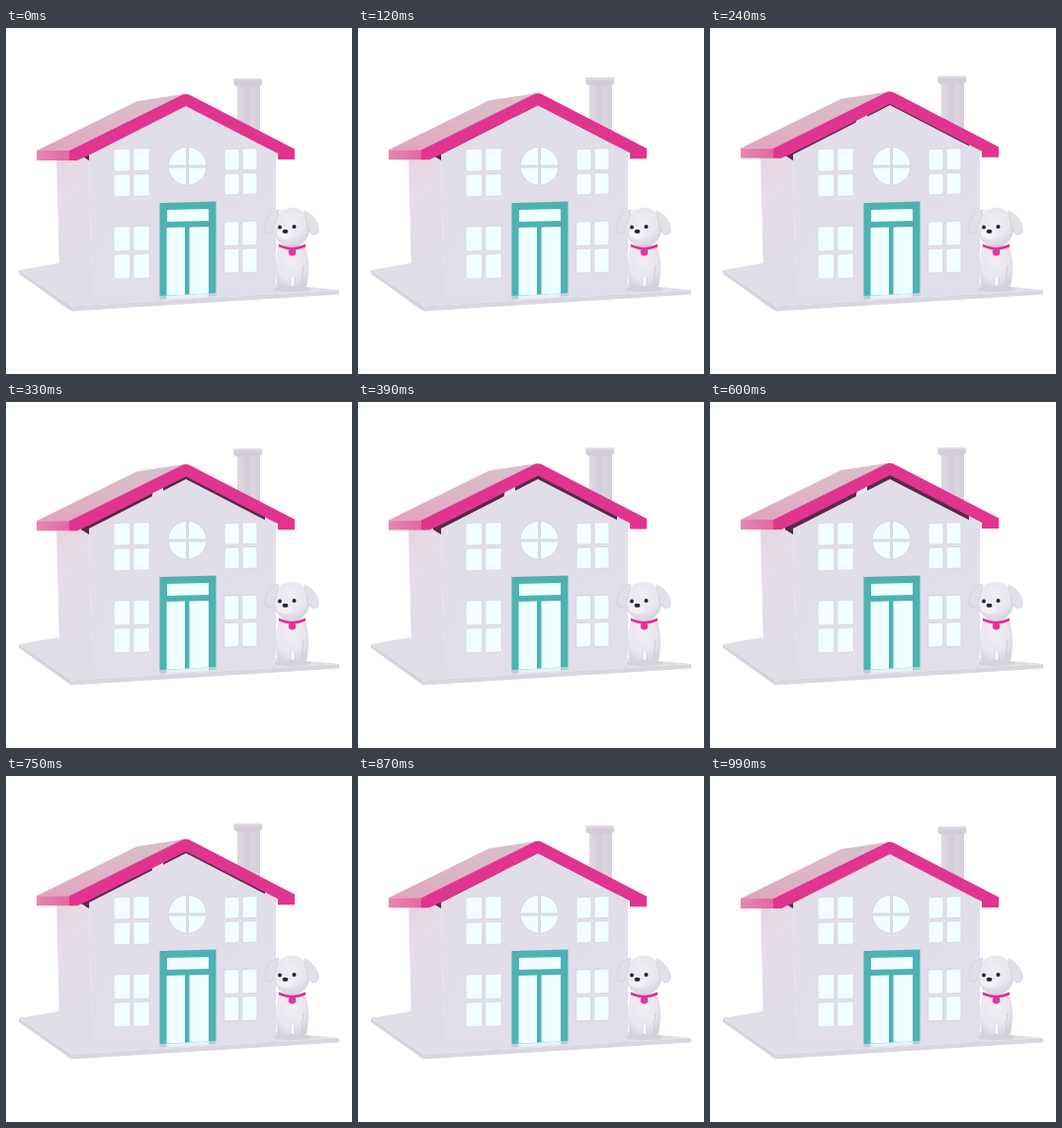
Recreate the animation shown at these times as an HTML page. Size 350x350 px, loop 1860 ms.

```html
<!DOCTYPE html>
<html lang="en">
<head>
<meta charset="utf-8">
<title>House with a lifting roof</title>
<style>
  html, body { margin: 0; width: 100%; height: 100%; overflow: hidden; background: #fff; }
  svg { display: block; width: 100%; height: 100%; }
</style>
</head>
<body>
<svg viewBox="0 0 350 350">
  <defs>
    <linearGradient id="front" x1="0" y1="0" x2="0.25" y2="1">
      <stop offset="0" stop-color="#e1dee9"/>
      <stop offset="1" stop-color="#e2dfeb"/>
    </linearGradient>
    <linearGradient id="side" x1="0" y1="0" x2="0.3" y2="1">
      <stop offset="0" stop-color="#e8d3de"/>
      <stop offset="0.35" stop-color="#e5dde7"/>
      <stop offset="1" stop-color="#dfdde7"/>
    </linearGradient>
    <linearGradient id="slope" x1="0" y1="1" x2="0.8" y2="0">
      <stop offset="0" stop-color="#e0a3bd"/>
      <stop offset="0.5" stop-color="#dcb6c6"/>
      <stop offset="1" stop-color="#d9bfcb"/>
    </linearGradient>
    <linearGradient id="eave">
      <stop offset="0" stop-color="#e588b1"/>
      <stop offset="1" stop-color="#e2689f"/>
    </linearGradient>
    <linearGradient id="stack">
      <stop offset="0" stop-color="#dfd9e2"/>
      <stop offset="0.5" stop-color="#d3ccd8"/>
      <stop offset="0.65" stop-color="#dcd5df"/>
      <stop offset="1" stop-color="#d6ced9"/>
    </linearGradient>
    <radialGradient id="fur" cx="0.45" cy="0.35" r="0.65">
      <stop offset="0" stop-color="#f0eff4"/>
      <stop offset="0.65" stop-color="#e9e7ef"/>
      <stop offset="1" stop-color="#d5d2dd"/>
    </radialGradient>
  </defs>

  <!-- base -->
  <path d="M13 245 53 238 337 265 66 281.500Z" fill="#e1dee7"/>
  <path d="M13 245 66 281.500V286.500L13 248.500Z" fill="#d6d2dd"/>
  <path d="M66 281.500 337 265V269.500L66 286.500Z" fill="#dad6e1"/>

  <!-- walls, with the dark space under the roof behind the front one -->
  <path d="M51 127 84 126 87 273 54 250Z" fill="url(#side)"/>
  <path d="M76 126 182 70 262 112V124L182 84 84 134 76 129Z" fill="#56294a"/>
  <path d="M262 112 273 118V128H262Z" fill="#e2dfea"/>
  <path d="M149 88 159 83V94L147 100Z" fill="#f1edf3"/>
  <path d="M84 128 182 78 273 125V265L87 273Z" fill="url(#front)"/>

  <g id="windows"></g>

  <!-- round window -->
  <circle cx="183.500" cy="139.700" r="19.500" fill="#f2feff" stroke="#d3d1df"/>
  <path d="M183.500 120V159.500M164 140H203" stroke="#dcd9e6" stroke-width="3"/>

  <!-- door -->
  <path d="M155.500 271 212.500 268V271L155.500 274.500Z" fill="#aed3d8"/>
  <path d="M162.500 271 205 268.500V272L162.500 274.500Z" fill="#e6f3f6"/>
  <path d="M155.500 177 212.500 175.500V268L155.500 271Z" fill="#4db2b3"/>
  <path d="M163 184 205 183V195L163 196Z" fill="#effeff"/>
  <path d="M162.500 202 181 201.500V269.700L162.500 270.600Z" fill="#effeff"/>
  <path d="M185.500 201.500 205 201V268.400L185.500 269.500Z" fill="#effeff"/>

  <!-- roof -->
  <g id="roof">
    <path d="M234 57H257V112L234 100Z" fill="url(#stack)"/>
    <path d="M230.500 51H259V57L256 59H233L230.500 57Z" fill="#d4ccd8"/>
    <path d="M230.500 51H259V53H230.500Z" fill="#e0dae3"/>
    <path d="M31 124 132.500 74 182 66.500 64 124Z" fill="url(#slope)"/>
    <path d="M31 124H64V134H31Z" fill="url(#eave)"/>
    <path d="M64 124 178 67.700Q182 65.600 186 67.700L292 122.500V133H275V127L182 79 84 128.500 72 134H64Z" fill="#e1348f"/>
  </g>

  <!-- dog -->
  <g>
    <ellipse cx="290" cy="264" rx="19" ry="3" fill="#d5d0dd"/>
    <path d="M277 220C272 230 272 247 275 262Q281 267 287 262L288 252H292L292 263Q299 267 304 261C307 247 307 231 302 220Z" fill="url(#fur)"/>
    <path d="M288 252V262M292 252V262M301 240Q299 250 300 260" fill="none" stroke="#cfcbd7"/>
    <path d="M276 218.500Q289 225 303 218.500V221.500Q290 227.500 276 221.500Z" fill="#e52f90"/>
    <circle cx="289.500" cy="226.700" r="3.800" fill="#e53594"/>
    <ellipse cx="289" cy="201.500" rx="18.500" ry="20" fill="url(#fur)"/>
    <path d="M276 184C268 185 262 194 262 202C262 208 267 210 270 205Q274 196 276 184Z" fill="#e2dfe8" stroke="#d0ccd9" stroke-width="0.700"/>
    <path d="M302 185C310 188 316 197 316 204C316 210 310 210 307 206Q303 198 302 185Z" fill="#e2dfe8" stroke="#d0ccd9" stroke-width="0.700"/>
    <ellipse cx="282.500" cy="208" rx="8.500" ry="6" fill="#f1f0f5"/>
    <circle cx="277" cy="201.500" r="1.900" fill="#29232f"/>
    <circle cx="291.500" cy="201" r="2" fill="#29232f"/>
    <ellipse cx="282.500" cy="205.700" rx="2.800" ry="2" fill="#29232f"/>
  </g>
</svg>

<script>
const LOOP = 1860, STEP = 30, UP_END = 510, DOWN_START = 540, DOWN_END = 990, RISE = 5.2;
const roof = document.getElementById("roof");

// Four panes with rounded corners, slightly skewed to follow the wall.
function windowMarkup(x, y, w, h) {
  const gap = 3, pw = (w - gap) / 2, ph = (h - gap) / 2;
  let panes = "";
  for (const col of [0, 1]) for (const row of [0, 1]) {
    panes += `<rect x="${x + col * (pw + gap)}" y="${y + row * (ph + gap)}" width="${pw}" height="${ph}"
      rx="2" fill="#f2feff" stroke="#d3d1df" stroke-width="0.8"/>`;
  }
  return `<g transform="translate(${x} ${y}) skewY(-1.5) translate(${-x} ${-y})">${panes}</g>`;
}

document.getElementById("windows").innerHTML =
  windowMarkup(109, 122.5, 36.5, 48.5) + windowMarkup(221, 122.5, 33, 46.5) +
  windowMarkup(109, 201, 36.5, 53) + windowMarkup(220.5, 196, 33.5, 52);

const ease = p => (1 - Math.cos(Math.PI * Math.min(1, Math.max(0, p)))) / 2;

// Up, a short rest at the top, down, then still until the loop ends.
function lift(t) {
  return RISE * (ease(t / UP_END) - ease((t - DOWN_START) / (DOWN_END - DOWN_START)));
}

function draw(now) {
  const t = Math.floor((now % LOOP) / STEP) * STEP;
  roof.setAttribute("transform", `translate(0 ${-lift(t)})`);
}

const start = performance.now();
function tick() {
  draw(performance.now() - start);
  requestAnimationFrame(tick);
}
tick();
</script>
</body>
</html>
```
